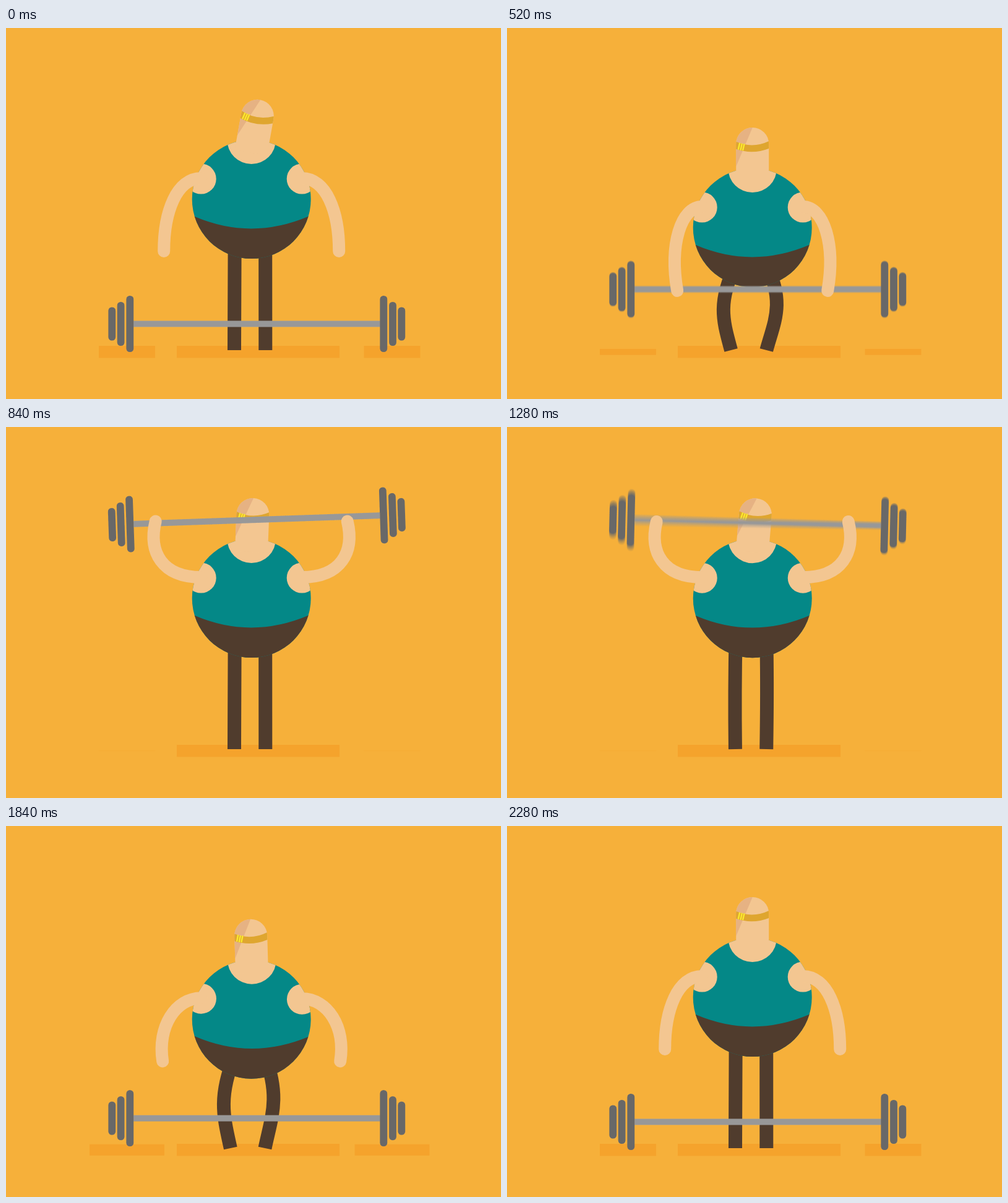
An HTML page with a canvas for the animation above (2.4 s loop, 800x600 px).

```html
<!DOCTYPE html>
<html lang="en">
<head>
<meta charset="utf-8">
<title>Weightlifter</title>
<style>
  html, body { margin: 0; height: 100%; overflow: hidden; background: #f6b03a; }
  canvas { display: block; width: 100vw; height: 100vh; }
</style>
</head>
<body>
<canvas id="stage" width="800" height="600"></canvas>
<script>
const LOOP = 2400, GRAB = 260, PRESSED = 800, DROP = 1247, LAND = 1527;
const CENTER = 396.7, FLOOR = 478.5, TOP = 150, FEET = 521;
const SKIN = '#f3c691', SHADE = '#e6b283', SHIRT = '#048887', PANTS = '#503c2d',
      GROUND = '#f5a32c', BAND = '#dfa62f', STRIPE = '#fbe92c', STEEL = '#999', IRON = '#666';
const g = document.getElementById('stage').getContext('2d');
const layer = document.createElement('canvas');
layer.width = 800;
layer.height = 600;
const blur = layer.getContext('2d');

const rad = deg => deg * Math.PI / 180;
const clamp = u => Math.max(0, Math.min(1, u));
const ease = u => (u = clamp(u)) * u * (3 - 2 * u);
const hop = (t, start, time, height) => {
  const u = clamp((t - start) / time);
  return 4 * height * u * (1 - u);
};

// Pose: body shift, sink, tilt; hand spread, hand height, arm reach, elbow bulge
const stand = [0, 0, 0, 141.5, 361, 39, 0];
const grip = sink => [0, sink, 0, 121.5, 379 + sink, 34, 13];
const press = [0, 0, 0, 155, TOP + 2.5, 63, 12];
const stumble = [8.2, 50, 6, 150, 339.5, 41, 8];
const recover = [0, 35.7, .4, 143.5, 380.5, 41, 9];

// time, pose, head tilt
const keys = [
  [0, ...stand, 10.2], [GRAB, ...grip(102), 0], [520, ...grip(46), 0], [580, ...grip(42), 0],
  [PRESSED, ...press, 2], [1270, ...press, 4.8],
  [1560, ...stumble, 6.1], [1840, ...recover, -2], [2240, ...stand, 0]
];

// Smooth interpolation between keys without overshoot
function poseAt(t) {
  const last = keys.length - 1;
  if (t <= 0) return keys[0].slice(1);
  if (t >= keys[last][0]) return keys[last].slice(1);
  const i = keys.findIndex(k => k[0] > t) - 1;
  const slope = (j, c) => j < 0 || j >= last ? 0
    : (keys[j + 1][c] - keys[j][c]) / (keys[j + 1][0] - keys[j][0]);
  const tangent = (j, c) => {
    const a = slope(j - 1, c), b = slope(j, c);
    return a * b > 0 ? 2 * a * b / (a + b) : 0;
  };
  const p = keys[i], q = keys[i + 1], d = q[0] - p[0], u = (t - p[0]) / d, v = 1 - u;
  return p.slice(1).map((_, n) => {
    const c = n + 1;
    return p[c] * v * v * (1 + 2 * u) + q[c] * u * u * (3 - 2 * u)
      + d * u * v * (v * tangent(i, c) - u * tangent(i + 1, c));
  });
}

// Height, angle and squash of the barbell
function barbellAt(t) {
  if (t < GRAB) return [FLOOR, 0, 1];
  if (t < PRESSED) return [poseAt(t)[4] - 2.5, -2 * ease((t - 580) / 220), 1];
  if (t < DROP) return [TOP, -2 * Math.cos(Math.PI * (t - 820) / (DROP - 820)), 1];
  if (t < LAND) {
    const u = (t - DROP) / (LAND - DROP);
    return [TOP + (FLOOR - TOP) * u * u, 2 * (1 - u) * Math.cos(6 * u), 1];
  }
  const squash = .13 * Math.sin(Math.PI * clamp((t - LAND) / 63));
  return [FLOOR - hop(t, 1590, 200, 30) - hop(t, 1790, 100, 6), 0, 1 - squash];
}

function disc(x, y, r, color) {
  g.fillStyle = color;
  g.beginPath();
  g.arc(x, y, r, 0, 7);
  g.fill();
}

function limb(width, color, cap, x, y, ...curve) {
  g.strokeStyle = color;
  g.lineWidth = width;
  g.lineCap = cap;
  g.beginPath();
  g.moveTo(x, y);
  g.bezierCurveTo(...curve);
  g.stroke();
}

// Stage position of a point on the body
function onBody([shift, sink, tilt], x, y) {
  const c = Math.cos(rad(tilt)), s = Math.sin(rad(tilt));
  return [CENTER + shift + x * c - y * s, 277 + sink + x * s + y * c];
}

// Knees bow outward as the body sinks; a tilt drags the feet along
function drawLegs(pose) {
  const [, sink, tilt] = pose, bow = 4.5 * Math.sqrt(Math.max(0, sink));
  for (const side of [-1, 1]) {
    const [x, y] = onBody(pose, side < 0 ? -27 : 22.5, 60), h = FEET - y;
    const foot = (side < 0 ? 369 - .15 * sink : 419.3) - 2 * tilt;
    const knee = side < 0 ? -bow : bow - 4.6 * tilt;
    limb(22, PANTS, 'butt', x, y,
      x + knee, y + .45 * h, foot + .4 * knee, FEET - .33 * h, foot, FEET);
  }
}

function drawArms(pose) {
  const [shift, , , spread, handY, reach, elbow] = pose;
  for (const side of [-1, 1]) {
    const [x, y] = onBody(pose, side * 81.5, -34), hand = CENTER + shift + side * spread;
    limb(20, SKIN, 'round', x, y,
      x + side * reach, y, hand + side * elbow, handY - .55 * (handY - y), hand, handY);
  }
}

function drawShadows(t) {
  const spread = ease((t - LAND) / 33) * (1 - ease((t - 1820) / 420));
  const w = 91 * (1 + .33 * spread), h = 19.5 * .5 ** ((FLOOR - barbellAt(t)[0]) / 56);
  g.fillStyle = GROUND;
  g.fillRect(276, 514, 263, 19.5);
  for (const x of [195.5, 624]) g.fillRect(x - w / 2, 523.8 - h / 2, w, h);
}

function drawHead() {
  g.beginPath();
  g.moveTo(-26.5, 6);
  g.arc(0, -54.5, 26.5, Math.PI, 0);
  g.lineTo(26.5, 6);
  g.fillStyle = SKIN;
  g.fill();
  g.clip();
  g.fillStyle = SHADE;
  g.fill(new Path2D('M.5-82L-26.5-18L-40-82Z'));
  g.translate(0, -1.3);
  g.fillStyle = BAND;
  g.fill(new Path2D('M-27-57Q0-45 27-58V-46Q0-35.5-27-45Z'));
  g.strokeStyle = STRIPE;
  g.lineWidth = 2.4;
  g.stroke(new Path2D('M-20.5-55L-23-44M-16.8-54L-19.3-43M-13.2-53.5L-15.7-42.5'));
}

function drawTorso(pose) {
  g.save();
  g.translate(...onBody(pose, 0, 0));
  g.rotate(rad(pose[2]));
  g.save();
  g.beginPath();
  g.arc(0, 0, 96, 0, 7);
  g.clip();
  g.fillStyle = SHIRT;
  g.fillRect(-100, -100, 200, 200);
  g.fillStyle = PANTS;
  g.fill(new Path2D('M-110 18L-91.5 28Q0 67 92.5 27.5L110 18V110H-110Z'));
  disc(0, -96.4, 39.4, SKIN);
  for (const side of [-1, 1]) disc(side * 81.5, -33, 24.5, SKIN);
  g.restore();
  g.translate(0, -81);
  g.rotate(rad(pose[7]));
  drawHead();
  g.restore();
}

// Several exposures are averaged for motion blur
function drawBarbell(t) {
  const shots = 8, shutter = 28;
  blur.clearRect(0, 0, 800, 600);
  blur.globalCompositeOperation = 'lighter';
  blur.globalAlpha = 1 / shots;
  for (let i = 0; i < shots; i++) {
    const [y, angle, squash] = barbellAt(t + shutter * ((i + .5) / shots - .5));
    blur.save();
    blur.translate(405.3, y);
    blur.rotate(rad(angle));
    blur.scale(1, squash);
    blur.fillStyle = STEEL;
    blur.fillRect(-199, -5, 398, 10);
    blur.fillStyle = IRON;
    for (const [x, h] of [[205, 91], [219.7, 71], [234, 54]]) {
      for (const side of [-1, 1]) {
        blur.beginPath();
        blur.roundRect(side * x - 5.9, -h / 2, 11.8, h, 5.5);
        blur.fill();
      }
    }
    blur.restore();
  }
  g.drawImage(layer, 0, 0);
}

function draw(now) {
  const t = now % LOOP, pose = poseAt(t);
  g.fillStyle = '#f6b03a';
  g.fillRect(0, 0, 800, 600);
  drawShadows(t);
  drawLegs(pose);
  drawTorso(pose);
  drawBarbell(t);
  drawArms(pose);
}

let start;
function frame(now) {
  start ??= now;
  draw(now - start);
  requestAnimationFrame(frame);
}
draw(0);
requestAnimationFrame(frame);
</script>
</body>
</html>
```
